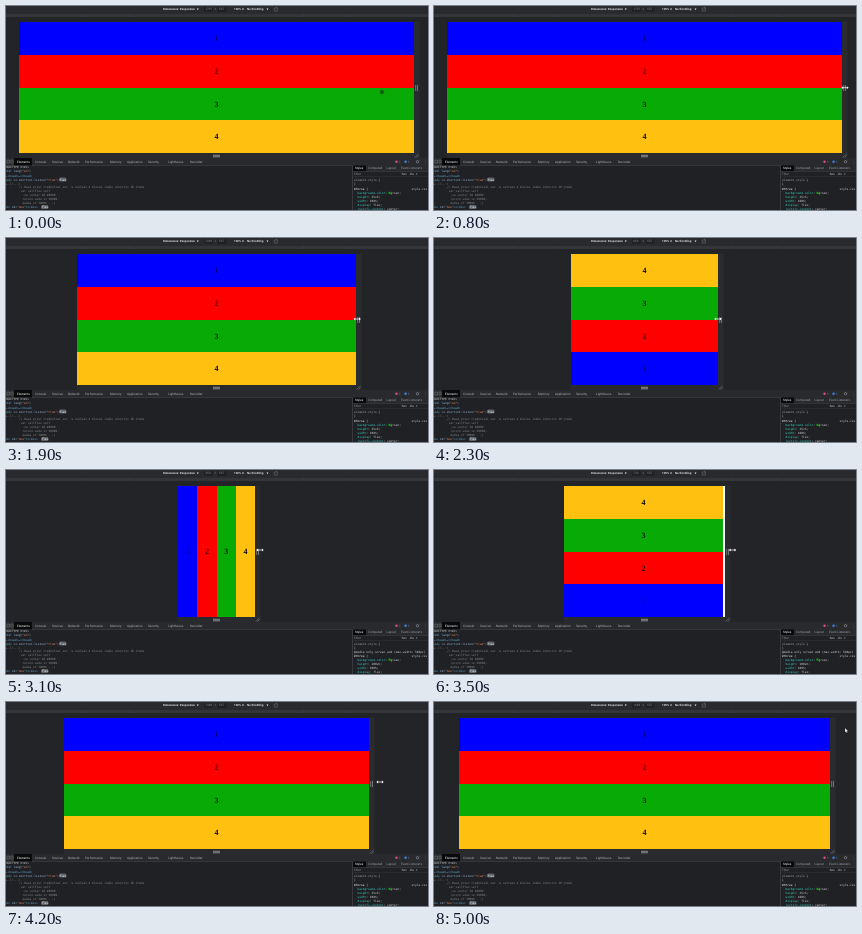
Write an HTML page that moves like this. It is 422 by 204 pixels and loops after 5100 ms.

```html
<!DOCTYPE html>
<html lang="en">
<head>
<meta charset="utf-8">
<title>Responsive rows</title>
<style>
  html, body { margin: 0; width: 100%; height: 100%; overflow: hidden; background: #202124; }
  svg { display: block; width: 422px; height: 204px; }
  text { white-space: pre; text-rendering: geometricPrecision; }
  .ui { font: 3.1px Roboto, sans-serif; }
  .bar { font: 600 2.9px Roboto, sans-serif; }
  .code { font: 2.9px "DejaVu Sans Mono", monospace; }
  .num { font: bold 8px "Liberation Serif", serif; text-anchor: middle; }
</style>
</head>
<body>
<svg id="stage" viewBox="0 0 422 204"></svg>
<script>
const LOOP = 5100, STEP = 100;
const TOP = 16, BOTTOM = 147, CENTER = 210.5;
const WIDE = 205, NARROW = 119;
const stage = document.getElementById('stage');

function add(parent, tag, attrs, content) {
  const el = document.createElementNS('http://www.w3.org/2000/svg', tag);
  set(el, attrs);
  if (content !== undefined) el.textContent = content;
  parent.append(el);
  return el;
}
function set(el, attrs) {
  for (const k in attrs) el.setAttribute(k, attrs[k]);
}
const group = () => add(stage, 'g', {});
const rect = (p, x, y, width, height, fill) => add(p, 'rect', { x, y, width, height, fill });
const path = (p, d, stroke, width = 0.6) =>
  add(p, 'path', { d, stroke, fill: 'none', 'stroke-width': width });
const ui = (x, y, s, fill = '#9aa0a6', type = 'ui') => add(stage, 'text', { x, y, fill, class: type }, s);
const show = (el, on) => el.setAttribute('visibility', on ? 'visible' : 'hidden');

// A code line made of [text, colour] runs
function code(p, x, y, ...runs) {
  const line = add(p, 'text', { x, y, class: 'code' });
  for (const [s, fill] of runs) add(line, 'tspan', { fill }, s);
}

// Emulated page and its resize strips
rect(stage, 0, 0, 422, 204, '#232427');
const side = rect(stage, 0, TOP, 5.5, 136, '#2a2b2e');
const foot = rect(stage, 0, BOTTOM, 10, 5, '#292a2d');
const page = rect(stage, 0, TOP, 10, BOTTOM - TOP, '#fff');
const boxes = [
  ['#0000ff', '#000090'], ['#ff0000', '#400000'], ['#08aa05', '#002400'], ['#ffc010', '#0a0800']
].map(([fill, ink], i) => ({
  box: rect(stage, 0, 0, 1, 1, fill),
  num: add(stage, 'text', { class: 'num', fill: ink }, i + 1)
}));
const sideGrip = path(stage, 'M-.9 79V85M.9 79V85', '#8d9095', 0.7);
const corner = path(stage, 'M0 151.5L4 147.8M2 151.5L4 149.6', '#8d9095', 0.5);
path(stage, 'M207 149.3H214M207 150.8H214', '#b0b2b5', 0.7);

// Device toolbar
rect(stage, 0, 0, 422, 8, '#292a2d');
rect(stage, 0, 8, 422, 3, '#343539');
for (const x of [79, 123, 297, 343]) rect(stage, x, 8.5, 0.5, 2.5, '#48494d');
const bright = '#dfe1e5';
ui(157, 4.4, 'Dimensions: Responsive', bright, 'bar');
ui(228, 4.4, '100%', bright, 'bar');
ui(241, 4.4, 'No throttling', bright, 'bar');
for (const x of [190.7, 236, 260.5])
  add(stage, 'path', { d: `M${x} 2.6h2l-1 1.7z`, fill: bright });
for (const x of [198, 211.5]) rect(stage, x, 1.2, 9, 4.6, '#202124');
const size = ui(199.3, 4.4, '', '#85888d');
ui(208.5, 4.4, '×', '#85888d');
ui(213, 4.4, '597', '#85888d');
path(stage, 'M268.3 2H271.3V5H268.3ZM270 1L271.5 2', '#85888d', 0.4);

// DevTools frame and tabs
rect(stage, 0, 152, 422, 52, '#202124');
rect(stage, 0, 152, 422, 7.5, '#292a2d');
rect(stage, 0, 159.4, 422, 0.5, '#44464a');
rect(stage, 8, 152, 18, 7.4, '#08090a');
path(stage, 'M1 154.2H3.5V157H1ZM5 154H7V157H5Z', '#8d9095', 0.4);
const tabs = { Elements: 11, Console: 29, Sources: 46, Network: 62, Performance: 79, Memory: 104,
  Application: 121, Security: 142, Lighthouse: 162, Recorder: 184 };
for (const name in tabs) ui(tabs[name], 156.8, name, name === 'Elements' ? '#fff' : '#b0b4b9');

// Elements tree
const TAG = '#5db0d7', ATTR = '#9bbbdc', VAL = '#f29766', DIM = '#85878b', TXT = '#d5d8dc';
function badge(x, y) {
  add(stage, 'rect', { x, y: y - 3, width: 7.5, height: 4, rx: 1.5, fill: '#5f6368' });
  code(stage, x + 0.4, y - 0.1, ['flex', '#fff']);
}
code(stage, -3, 162.2, ['<!DOCTYPE html>', TXT]);
code(stage, -3, 166.4, ['<html ', TAG], ['lang=', ATTR], ['"en"', VAL], ['>', TAG]);
code(stage, 0, 170.5, ['▸', DIM], ['<head>', TAG], ['…', TXT], ['</head>', TAG]);
code(stage, -3, 174.6, ['<body ', TAG], ['cz-shortcut-listen=', ATTR], ['"true"', VAL], ['>', TAG]);
badge(53, 174.6);
code(stage, 0, 178.7, ['▸ <!-- =', DIM]);
[
  "// Have prior credential set 'a contain 4 blocks index inherits 30 items",
  ' var callFlex self', '  -se center 30 40000', '  return wide in 30000;', '  media of 30000 - ;)'
].forEach((s, i) => code(stage, 13, 182.4 + i * 3.95, [s, DIM]));
code(stage, -3, 202, ['<div ', TAG], ['id=', ATTR], ['"one"', VAL], ['></div>', TAG]);
badge(35, 202);

// Styles pane
rect(stage, 346, 152, 76, 13.4, '#292a2d');
rect(stage, 346, 159.5, 0.6, 44.5, '#494c50');
rect(stage, 347, 159.5, 13, 5.6, '#08090a');
rect(stage, 346, 165.2, 76, 0.4, '#494c50');
rect(stage, 346, 170.6, 76, 0.4, '#3a3c40');
add(stage, 'circle', { cx: 390.5, cy: 155.7, r: 1.2, fill: '#d8507c' });
ui(393, 156.8, '1');
rect(stage, 398.5, 154.6, 2.2, 2.2, '#3b82f0');
ui(402, 156.8, '1');
add(stage, 'circle', { cx: 411.5, cy: 155.7, r: 1.2, fill: 'none', stroke: '#9aa0a6', 'stroke-width': 0.6 });
ui(418, 156.8, '⋮');
ui(349, 163.4, 'Styles', '#fff');
ui(362, 163.4, 'Computed');
ui(380.5, 163.4, 'Layout');
ui(395, 163.4, 'Event Listeners');
ui(348, 169.3, 'Filter', '#8d9095');
ui(395, 169.3, ':hov   .cls   +', TXT);
code(stage, 348, 175.2, ['element.style', '#a0a3a8'], [' {', TXT]);
code(stage, 348, 179, ['}', TXT]);

function rules(y, items) {
  const g = group();
  code(g, 348, y, ['#three', '#fff'], [' {', TXT]);
  code(g, 405.5, y, ['style.css', TXT]);
  items.forEach(([k, v], i) => {
    const ly = y + 4.05 * (i + 1);
    code(g, 351.5, ly, [k, '#35d4c7'], [': ', TXT], [i ? v : ' ' + v, TXT], [';', TXT]);
    if (!i) rect(g, 382.5, ly - 2.1, 2, 2.1, '#08aa05');
  });
  return g;
}
const common = [['width', '100%'], ['display', 'flex']];
const color = ['background-color', 'green'];
const plain = rules(183.9, [color, ['height', '25vh'], ...common, ['justify-content', 'center']]);
const media = rules(186.6, [color, ['height', '100vh'], ...common]);
code(media, 348, 182.6, ['@media only screen and (max-width: 540px)', TXT]);

// Pointers
const touch = add(stage, 'circle', { r: 1.9, fill: '#0006', stroke: '#2b5a2b', 'stroke-width': 0.6 });
const resize = group();
path(resize, 'M-3 0H3', '#fff', 0.7);
add(resize, 'path', { d: 'M-3.6 0l1.7-1.4v2.8zM3.6 0l-1.7-1.4v2.8z', fill: '#fff' });
const arrow = add(stage, 'path', {
  d: 'M-1-2V2.4L.1 1.4 .8 3 1.5 2.7 .8 1.2H2.2Z', fill: '#fff', stroke: '#000', 'stroke-width': 0.2
});

// Steps of [ms, ...values]
const leftSteps = [[0, 13], [1200, 13], [1400, 31], [1800, 54], [2300, 137], [2600, 164], [2900, 176],
  [3100, 172], [3500, 130], [3600, 116], [4200, 58], [4700, 25], [5100, 25]];
const pointerSteps = [[0, 376, 86], [300, 392, 84], [600, 411, 82], [1200, 411, 81], [1400, 390, 81],
  [1800, 368, 81], [2300, 284, 81], [2600, 262, 81], [2900, 250, 80], [3100, 254, 80],
  [3500, 298.5, 80], [4200, 374, 80], [4700, 402, 80], [4800, 404, 109], [5000, 412, 28], [5100, 412, 28]];

function at(steps, t, k = 1) {
  const i = steps.findIndex(s => s[0] > t);
  const a = steps[i - 1], b = steps[i];
  return a[k] + (b[k] - a[k]) * (t - a[0]) / (b[0] - a[0]);
}

// Snap to whole pixels so neighbours meet without seams
function place(el, x, y, w, h) {
  const [l, t, r, b] = [x, y, x + w, y + h].map(Math.round);
  set(el, { x: l, y: t, width: r - l, height: b - t });
}

function draw(t) {
  const left = Math.round(at(leftSteps, t)), right = 2 * CENTER - left, width = right - left;
  const columns = width < NARROW, reversed = !columns && width < WIDE;
  const growing = t >= 3300 && t <= 3700;
  const w = (width - (growing ? 2 : 0)) / (columns ? 4 : 1);
  const h = (BOTTOM - TOP) / (columns ? 1 : 4);

  boxes.forEach(({ box, num }, i) => {
    const n = reversed ? 3 - i : i;
    const x = left + (columns ? n * w : 0), y = TOP + (columns ? 0 : n * h);
    place(box, x, y, w, h);
    set(num, { x: x + w / 2, y: y + h / 2 + 2.7 });
  });
  place(page, left, TOP, width, BOTTOM - TOP);
  set(side, { x: right });
  set(foot, { x: left, width: width + 5.5 });
  set(sideGrip, { transform: `translate(${right + 2.6} 0)` });
  set(corner, { transform: `translate(${right + 0.6} 0)` });
  size.textContent = Math.round(width * 4.55);

  const inMedia = t >= 2700 && t < 3600;
  show(media, inMedia);
  show(plain, !inMedia);

  const px = at(pointerSteps, t), py = at(pointerSteps, t, 2);
  const done = t >= 4800, onPage = t < 600;
  for (const [el, on] of [[touch, onPage], [resize, !onPage && !done], [arrow, done]]) {
    set(el, { transform: `translate(${px} ${py})` });
    show(el, on);
  }
}

const start = performance.now();
function tick() {
  const t = (performance.now() - start) % LOOP;
  draw(Math.floor(t / STEP) * STEP);
  requestAnimationFrame(tick);
}
tick();
</script>
</body>
</html>
```
